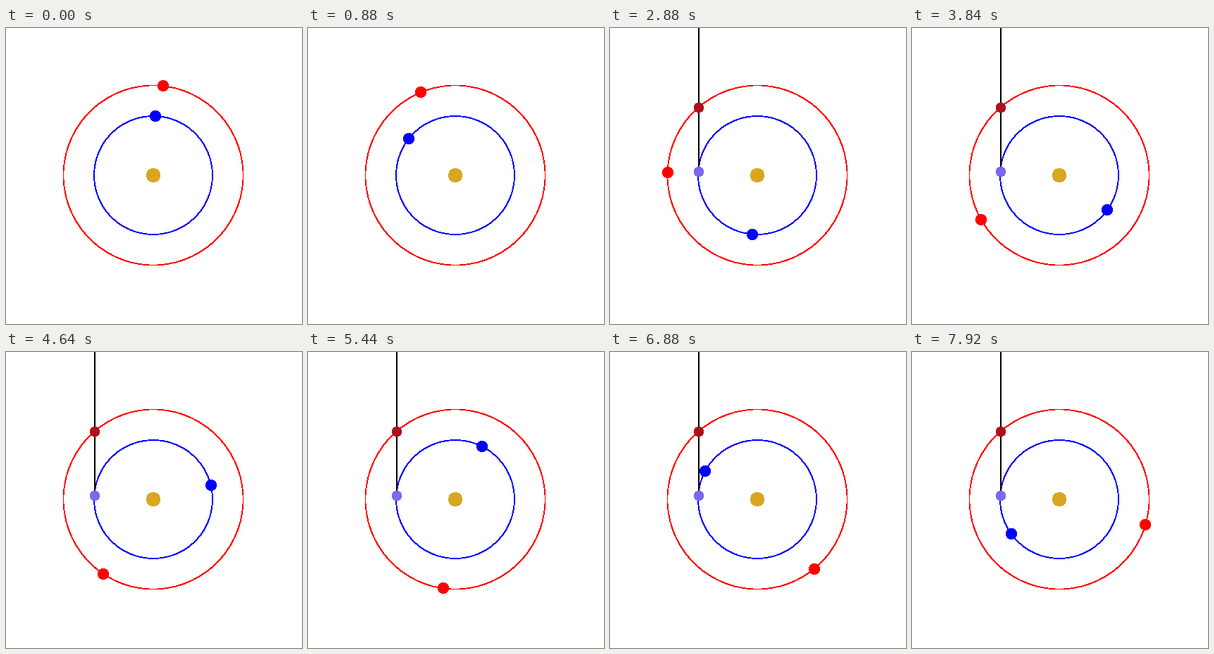
Recreate the animation shown at these times as a matplotlib script. Size 420x420 px, loop 8 s.

```python
import numpy as np
import matplotlib.pyplot as plt
from matplotlib.animation import FuncAnimation
from matplotlib.patches import Circle

SIZE, DPI = 420, 100
FRAMES, INTERVAL = 100, 80
PX = 72 / DPI                      # one pixel in points
CENTER = np.array([209, 209])
SIGHTING = 18                      # frame in which both planets line up

EARTH = dict(radius=84, start=87.7, step=360 / 73)
MARS = dict(radius=127.5, start=83.8, step=360 / 73 / 1.88)

fig = plt.figure(figsize=(SIZE / DPI, SIZE / DPI), dpi=DPI, facecolor="white")
ax = fig.add_axes([0, 0, 1, 1])
ax.set_xlim(0, SIZE)
ax.set_ylim(SIZE, 0)
ax.axis("off")


def position(planet, frame):
    """Place on the orbit, snapped to whole pixels."""
    angle = np.radians(planet["start"] + planet["step"] * frame)
    offset = planet["radius"] * np.array([np.cos(angle), -np.sin(angle)])
    return np.round(CENTER + offset)


def dot(center, radius, color, z):
    return ax.add_patch(Circle(center, radius, fc=color, ec="none",
                               antialiased=False, zorder=z))


def orbit(planet, color):
    ax.add_patch(Circle(CENTER, planet["radius"], fill=False, ec=color,
                        lw=0.8 * PX, antialiased=False, zorder=1))


orbit(MARS, "red")
orbit(EARTH, "blue")
dot(CENTER, 9.5, "goldenrod", 2)

sight, = ax.plot([126, 126], [0, 204], color="black", lw=2 * PX,
                 antialiased=False, zorder=3)
marks = [sight,
         dot((126, 113), 6.6, "#b0101a", 4),
         dot((126, 204), 6.6, "mediumslateblue", 4)]
mars = dot(position(MARS, 0), 7.6, "red", 5)
earth = dot(position(EARTH, 0), 7.6, "blue", 5)


def update(frame):
    mars.center = position(MARS, frame)
    earth.center = position(EARTH, frame)
    for mark in marks:
        mark.set_visible(frame >= SIGHTING)
    return [mars, earth, *marks]


anim = FuncAnimation(fig, update, frames=FRAMES, interval=INTERVAL,
                     repeat=True, repeat_delay=0)
plt.show()
```
